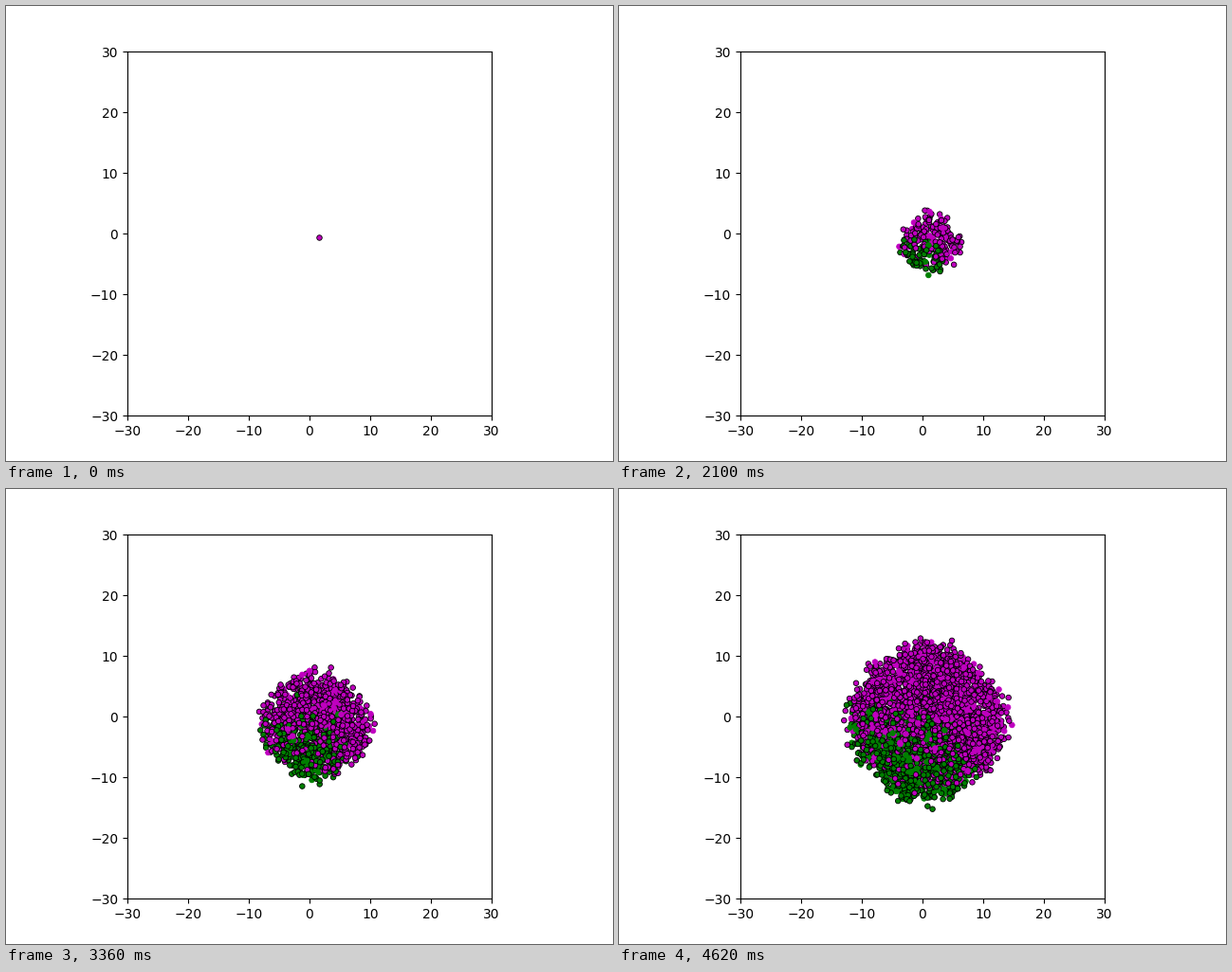
Recreate the animation shown at these times as a matplotlib script. Size 640 px wide and 480 px high, loop 5040 ms.

```python
import numpy as np
import matplotlib.pyplot as plt
from matplotlib.animation import FuncAnimation

FRAMES, STEP = 12, 420
PLUM, GREEN = (0.75, 0, 0.75, 1), (0, 0.5, 0, 1)
BLACK = (0, 0, 0, 1)


def count(step):
    return 1 + int(1.05 * step ** 3.4)


def reach(step):
    return max(1.38 * step - 0.9, 0)


def centre(step):
    return np.array([1.6 - 0.08 * step,
                     -0.6 - 1.1 * np.sin(np.pi * step / FRAMES)])


def make_colony(total):
    """Unit-disc places, colours and outlines of all cells, oldest first."""
    rng = np.random.default_rng(7)
    angle = rng.uniform(0, 2 * np.pi, total)
    rho = 0.84 * rng.random(total) ** 0.55
    rho *= 1 + 0.04 * np.cos(4 * angle) + 0.03 * np.sin(9 * angle)
    rho = np.abs(rho + rng.normal(0, 0.055, total))
    rho[0] = 0

    # Green fills a wedge towards the lower left and blends in the middle
    lean = rho * (np.cos(angle + np.radians(115)) - 0.5)
    green = rng.random(total) < 1 / (1 + np.exp(0.4 - 7 * lean))
    green[0] = False

    places = np.column_stack([rho * np.cos(angle), rho * np.sin(angle)])
    fill = np.where(green[:, None], GREEN, PLUM)
    outlined = rng.random((total, 1)) < 0.87
    outlined[0] = True
    return places, fill, np.where(outlined, BLACK, fill)


PLACES, FILL, EDGE = make_colony(count(FRAMES - 1))

fig = plt.figure(figsize=(6.4, 4.8), dpi=100)
ax = fig.add_axes([0.1, 0.1, 0.8, 0.8], aspect="equal")
ax.set(xlim=(-30, 30), ylim=(-30, 30),
       xticks=range(-30, 31, 10), yticks=range(-30, 31, 10))
dots = ax.scatter([], [], s=16, linewidths=0.6)


def draw(step):
    n = count(step)
    wobble = np.random.default_rng(100 + step).normal(0, 0.03, (n, 2))
    dots.set_offsets(centre(step) + reach(step) * (PLACES[:n] + wobble))
    dots.set_facecolors(FILL[:n])
    dots.set_edgecolors(EDGE[:n])
    return [dots]


anim = FuncAnimation(fig, draw, frames=FRAMES, interval=STEP,
                     repeat=True, repeat_delay=0, blit=False)
plt.show()
```
